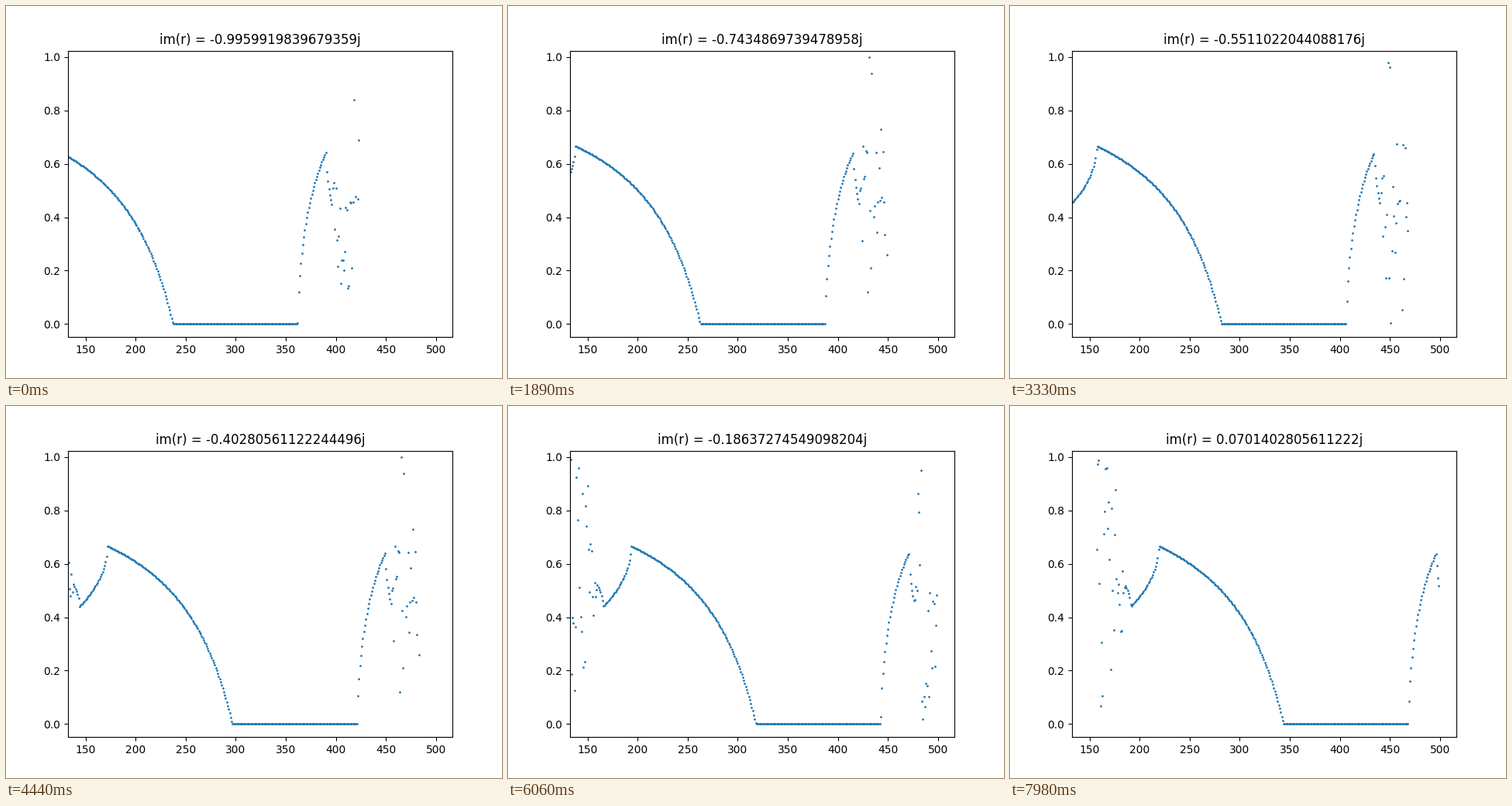
These frames come from a looping animation (640 px wide and 480 px high, 8000 ms). A matplotlib script:

```python
import numpy as np
import matplotlib.pyplot as plt
from matplotlib.animation import FuncAnimation

FRAMES = 267
LOOP_MS = 8000
COUNT = 500
ITERATIONS = 1000
STRIDE, SHIFT = 5, 2      # the curve drifts 2/5 of an index per frame
FIRST = -SHIFT * (FRAMES - 1)
TOP = 0.975


def logistic(r):
    """Size of the last iterate of x -> r x (1 - x), started at 1/2."""
    x = np.full_like(r, 0.5)
    with np.errstate(all="ignore"):
        for _ in range(ITERATIONS):
            x = r * x * (1 - x)
    return np.where(np.isfinite(x), np.abs(x), np.nan)


# One fine orbit diagram; each frame reads every STRIDE-th cell of it.
cells = np.arange(FIRST, STRIDE * COUNT)
orbit = logistic(4.8 + (3.2 - 1.6 * cells) / (COUNT - 1))

index = np.arange(COUNT)
imag = np.linspace(-1, 1, COUNT)

fig, ax = plt.subplots(figsize=(6.4, 4.8), dpi=100)
dots, = ax.plot([], [], "o", color="#1f77b4", markersize=1)
ax.set_xlim(132.55, 516.45)
ax.set_ylim(-0.05 * TOP, 1.05 * TOP)
title = ax.set_title("")


def draw(k):
    dots.set_data(index, orbit[STRIDE * index - SHIFT * k - FIRST])
    title.set_text(f"im(r) = {float(imag[k + 1])}j")
    return dots, title


anim = FuncAnimation(fig, draw, frames=FRAMES, interval=LOOP_MS / FRAMES,
                     init_func=lambda: draw(0), repeat=True, repeat_delay=0)
plt.show()
```
